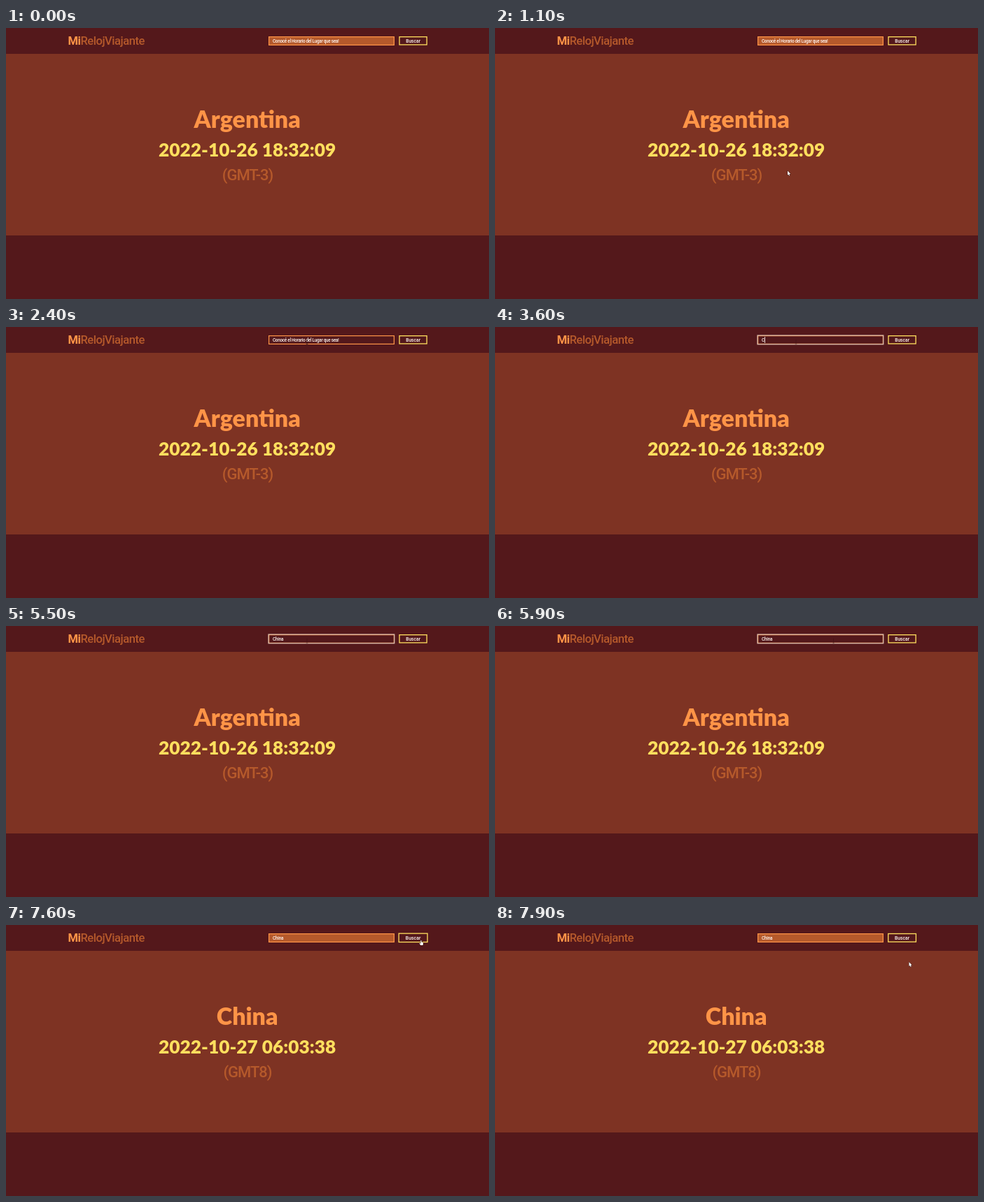
Write an HTML page with a canvas that moves like this. It is 690x388 px and loops after 8 s.

```html
<!DOCTYPE html>
<html lang="es">
<head>
<meta charset="utf-8">
<title>Horario mundial</title>
<style>
html, body { margin: 0; width: 100%; height: 100%; overflow: hidden; background: #54181b; }
canvas { display: block; width: 690px; height: 388px; }
</style>
</head>
<body>
<canvas id="stage"></canvas>
<script>
const W = 690, H = 388, LOOP = 8000;
const WINE = '#54181b', RUST = '#7e3323', COPPER = '#b5592b';
const ORANGE = '#ff9447', YELLOW = '#ffdf5e', WHITE = '#fff6f2';
const UI = 'Roboto, sans-serif', DISPLAY = 'Lato, sans-serif';

const canvas = document.getElementById('stage');
const ctx = canvas.getContext('2d');
const ratio = window.devicePixelRatio || 1;
canvas.width = W * ratio;
canvas.height = H * ratio;
ctx.scale(ratio, ratio);

// Pointer stops: time, x, y
const path = [
  [800, 432, 318], [1100, 418, 204.5], [1300, 420, 202], [1700, 428, 172],
  [2100, 430, 20], [5650, 430, 20], [6300, 592.5, 19.5],
  [7550, 592.5, 19.5], [7850, 591.5, 53], [8000, 591.5, 53]
];

// Typed length by time
const keys = [3550, 4150, 4350, 4650, 4850];

const clamp = v => Math.max(0, Math.min(1, v));
const ease = v => v * v * (3 - 2 * v);
const ramp = (t, from, to) => ease(clamp((t - from) / (to - from)));
const between = (t, from, to) => t >= from && t < to;

function pointerAt(t) {
  for (let i = 1; i < path.length; i++) {
    const [t0, x0, y0] = path[i - 1], [t1, x1, y1] = path[i];
    if (t <= t1) {
      const k = ease(clamp((t - t0) / (t1 - t0)));
      return [x0 + (x1 - x0) * k, y0 + (y1 - y0) * k];
    }
  }
}

function rect(x, y, w, h, color) {
  ctx.fillStyle = color;
  ctx.fillRect(x, y, w, h);
}

function frame(x, y, w, h, line, color) {
  ctx.strokeStyle = color;
  ctx.lineWidth = line;
  ctx.strokeRect(x + line / 2, y + line / 2, w - line, h - line);
}

// Draws a string and returns its advance
function text(str, x, y, font, color, align = 'left', spacing = 0) {
  ctx.font = font;
  ctx.letterSpacing = spacing + 'px';
  ctx.textAlign = align;
  ctx.fillStyle = color;
  ctx.fillText(str, x, y);
  return ctx.measureText(str).width;
}

function drawLogo() {
  const w = text('Mi', 88.5, 24, '700 16.6px ' + UI, ORANGE, 'left', -0.5);
  text('RelojViajante', 88.5 + w, 24, '500 16.6px ' + UI, COPPER, 'left', -0.5);
}

function drawInput(t) {
  const dark = ramp(t, 1980, 2280) - ramp(t, 6050, 6350);
  const focused = between(t, 2850, 6600);
  rect(375, 12, 180, 13, COPPER);
  ctx.globalAlpha = clamp(dark);
  rect(375, 12, 180, 13, WINE);
  ctx.globalAlpha = 1;
  frame(375, 12, 180, 13, 1.2, ORANGE);
  if (focused) {
    frame(374.4, 11.4, 181, 14, 1.2, '#d8bfb4');
  }

  const count = keys.filter(k => t >= k).length;
  const value = 'China'.slice(0, count);
  const font = '500 6.4px ' + UI;
  let caretX = 381;
  if (count) caretX += text(value, 381, 20.8, font, WHITE, 'left', -0.2);
  else text('Conocé el Horario del Lugar que sea!', 381, 20.8, font, WHITE, 'left', -0.3);

  const blinkStart = t < 4850 ? t : 4950;
  const lit = (t - blinkStart) % 1000 < 500;
  if (focused && count && lit) rect(caretX + 0.2, 14, 0.8, 9, WHITE);
}

function drawButton(t) {
  const hover = ramp(t, 6180, 6380) - ramp(t, 7650, 8050);
  const grow = 0.9 * hover;
  frame(561.4 - grow, 12 - grow * 0.6, 40.4 + grow * 2, 12.6 + grow * 1.2, 1.3, YELLOW);
  text('Buscar', 581.6, 20.8, `500 ${6.7 + hover * 0.2}px ${UI}`, WHITE, 'center');
}

function drawResult(t) {
  const done = t >= 7550;
  text(done ? 'China' : 'Argentina', 344.7, 142.5, '900 34px ' + DISPLAY, ORANGE, 'center');
  text(done ? '2022-10-27 06:03:38' : '2022-10-26 18:32:09', 344.7, 184.3,
    '900 26.3px ' + DISPLAY, YELLOW, 'center');
  text(done ? '(GMT8)' : '(GMT-3)', 345, 218, '500 22px ' + UI, COPPER, 'center', -1);
}

function polygon(points, fill, stroke) {
  ctx.beginPath();
  points.forEach(([x, y]) => ctx.lineTo(x, y));
  ctx.closePath();
  ctx.lineWidth = 0.8;
  ctx.strokeStyle = stroke;
  ctx.stroke();
  ctx.fillStyle = fill;
  ctx.fill();
}

const arrow = [[0, 0], [0, 6], [1.3, 4.9], [2.2, 7], [3.2, 6.5], [2.3, 4.5], [4.2, 4.4]];
const hand = [[0, 0], [1, 0], [1.2, 2.5], [3.5, 3.2], [3.6, 5.2], [2.9, 7],
  [0, 7], [-2, 4.4], [-1.4, 3.8], [0, 4.8]];

function drawPointer(t) {
  if (t < 850) return;
  const [x, y] = pointerAt(t);
  const overInput = between(x, 375, 555) && between(y, 12, 25);
  const overButton = between(x, 561, 602) && between(y, 12, 25);
  if (overInput) {
    ctx.globalAlpha = t < 3500 ? 0.7 : 0.35;
    rect(x - 0.4, y - 2, 0.8, 7, '#260a0d');
    rect(x - 1.5, y + 4.5, 3, 0.7, '#260a0d');
    ctx.globalAlpha = 1;
    return;
  }
  ctx.save();
  ctx.translate(x, y);
  polygon(overButton ? hand : arrow, '#fff', '#2b1110');
  ctx.restore();
}

function draw(now) {
  const t = now % LOOP;
  rect(0, 0, W, H, WINE);
  rect(0, 37, W, 260, RUST);
  drawLogo();
  drawInput(t);
  drawButton(t);
  drawResult(t);
  drawPointer(t);
}

let start;
function tick(now) {
  if (start === undefined) start = now;
  draw(now - start);
  requestAnimationFrame(tick);
}
requestAnimationFrame(tick);
</script>
</body>
</html>
```
